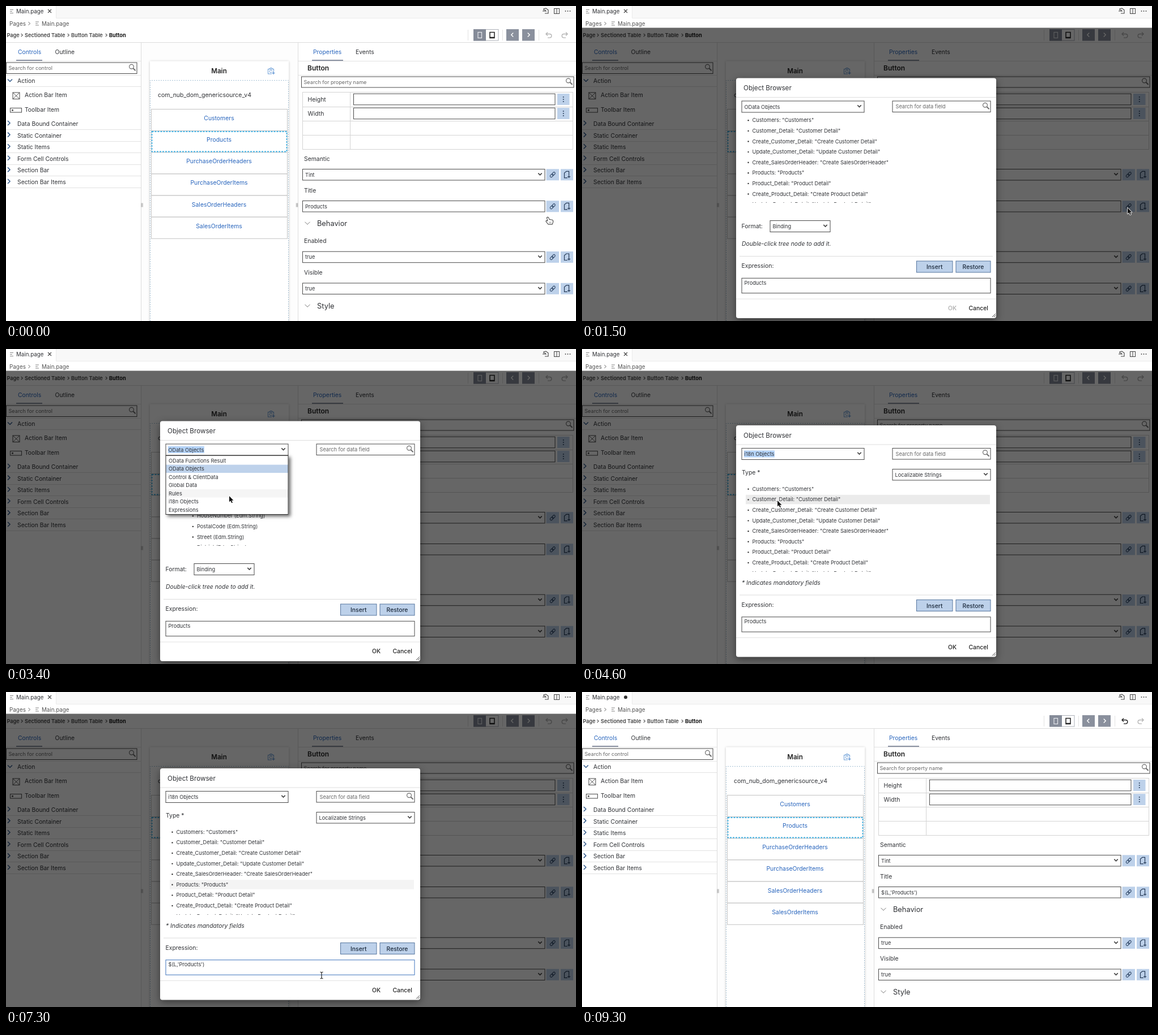
Recreate the animation shown at these times as an HTML page with a canvas. Size 1006 px wide and 557 px high, loop 9.5 s.

```html
<!DOCTYPE html>
<html lang="en">
<head>
<meta charset="utf-8">
<title>Object browser</title>
<style>
html, body { margin: 0; width: 100%; height: 100%; overflow: hidden; background: #fff; }
canvas { display: block; width: 1006px; height: 557px; }
</style>
</head>
<body>
<canvas id="stage" width="1006" height="557"></canvas>
<script>
const ctx = document.getElementById('stage').getContext('2d');
const LOOP = 9500;
const INK = '#303236', BLUE = '#2865bd', PALE = '#bdd1ea', RULE = '#dcdcdc';
const TIMES = { open: 1300, loaded: 1700, drop: 2950, pick: 3850, insert: 6450, close: 8150, undim: 8300, dirty: 8600, hide: 9250 };

const strings = [
  'Customers: "Customers"', 'Customer_Detail: "Customer Detail"',
  'Create_Customer_Detail: "Create Customer Detail"', 'Update_Customer_Detail: "Update Customer Detail"',
  'Create_SalesOrderHeader: "Create SalesOrderHeader"', 'Products: "Products"',
  'Product_Detail: "Product Detail"', 'Create_Product_Detail: "Create Product Detail"',
  'Update_Product_Detail: "Update Product Detail"'
];
const fields = ['Customers', 'Address (Address)', 'Building', 'City', 'Country', 'HouseNumber', 'PostalCode', 'Street', 'District'];
const sources = ['OData Functions Result', 'OData Objects', 'Control & ClientData', 'Global Data', 'Rules', 'i18n Objects', 'Expressions'];

// time, x, y of the pointer tip
const path = [
  [0, 957, 374], [200, 957, 374], [800, 963, 357], [1650, 963, 357], [2500, 440, 178], [2950, 440, 178],
  [3400, 394, 260], [3750, 350, 269], [4600, 345, 268], [5100, 345, 268], [5800, 348, 339],
  [6900, 348, 339], [7300, 557, 501], [7450, 557, 501], [7850, 656, 526], [8250, 660, 525],
  [8500, 660, 525], [9250, 760, 316]
];

// ---------- helpers ----------
function text(s, x, y, size = 10.4, color = INK, weight = 400, align = 'left', style = '') {
  ctx.font = `${style} ${weight} ${size}px Inter, "Liberation Sans", sans-serif`;
  ctx.fillStyle = color;
  ctx.textAlign = align;
  ctx.fillText(s, x, y + size * 0.36);
}
function rect(x1, y1, x2, y2, color) {
  ctx.fillStyle = color;
  ctx.fillRect(x1, y1, x2 - x1, y2 - y1);
}
function frame(x1, y1, x2, y2, color = '#4a4a4a', fill = '#fff', width = 1) {
  if (fill) rect(x1, y1, x2, y2, fill);
  ctx.strokeStyle = color;
  ctx.lineWidth = width;
  ctx.strokeRect(x1, y1, x2 - x1, y2 - y1);
}
function line(points, color = RULE, width = 1, dash = []) {
  ctx.strokeStyle = color;
  ctx.lineWidth = width;
  ctx.setLineDash(dash);
  ctx.beginPath();
  for (let i = 0; i < points.length; i += 2) ctx.lineTo(points[i], points[i + 1]);
  ctx.stroke();
  ctx.setLineDash([]);
}
function circle(x, y, r, color, fill = false, width = 1.2) {
  ctx.beginPath();
  ctx.arc(x, y, r, 0, 7);
  ctx.fillStyle = ctx.strokeStyle = color;
  ctx.lineWidth = width;
  fill ? ctx.fill() : ctx.stroke();
}
function at(x, y, draw, angle = 0) {
  ctx.save();
  ctx.translate(x, y);
  ctx.rotate(angle);
  draw();
  ctx.restore();
}
const down = (x, y, r = 3, color = '#444', w = 1.4) => line([x - r, y - r / 2, x, y + r / 2, x + r, y - r / 2], color, w);
const right = (x, y, r = 3, color = '#444', w = 1.4) => line([x - r / 2, y - r, x + r / 2, y, x - r / 2, y + r], color, w);
const left = (x, y, r, color, w) => line([x + r / 2, y - r, x - r / 2, y, x + r / 2, y + r], color, w);

function magnifier(x, y) {
  circle(x - 1.5, y - 1.5, 3.9, '#6a6a6a');
  line([x + 1.5, y + 1.5, x + 5.5, y + 5.5], '#6a6a6a', 1.8);
}
function search(x1, y1, x2, y2, hint) {
  frame(x1, y1, x2, y2);
  text(hint, x1 + 4, (y1 + y2) / 2, 9.15, '#666');
  magnifier(x2 - 8, (y1 + y2) / 2 - 1);
}
function field(x1, y1, x2, y2, value, list = true) {
  frame(x1, y1, x2, y2);
  text(value, x1 + 4.5, (y1 + y2) / 2 + 0.2, 9.2);
  if (list) down(x2 - 8.5, (y1 + y2) / 2 - 1, 3.2, '#444', 1.6);
}
function linkIcon(x, y) {
  at(x, y, () => {
    ctx.strokeStyle = '#2f4767';
    ctx.lineWidth = 1.1;
    for (const dx of [-5.5, -0.8]) {
      ctx.beginPath();
      ctx.roundRect(dx, -2, 6.3, 4, 2);
      ctx.stroke();
    }
  }, -Math.PI / 4);
}
function pageIcon(x, y, color = '#263b58') {
  line([x + 3.5, y + 1, x + 3.5, y - 6, x - 1, y - 6, x - 4.5, y - 3, x - 4.5, y + 5.5, x + 1, y + 5.5], color, 1.2);
  line([x + 1, y + 3.5, x + 6, y + 3.5], color, 1.2);
  line([x + 3.5, y + 1, x + 3.5, y + 6], color, 1.2);
}
function arrowBack(x, y, flip, color) {
  at(x, y, () => {
    ctx.scale(flip, 1);
    line([-2, -5, -5, -2, -2, 1], color, 1.4);
    ctx.beginPath();
    ctx.moveTo(-5, -2);
    ctx.lineTo(1.5, -2);
    ctx.arc(1.5, 1.3, 3.3, -Math.PI / 2, Math.PI / 2);
    ctx.lineTo(-2, 4.6);
    ctx.stroke();
  });
}
function listIcon(x, y) {
  for (const [dy, w] of [[-3, 6], [0, 4], [3, 6]]) line([x, y + dy, x + w, y + dy], '#888', 1);
}

// ---------- page ----------
function header(dirty) {
  rect(0, 0, 1006, 21, '#f8f8f8');
  rect(0, 0, 88, 22, '#fff');
  line([88.5, 0, 88.5, 21.5, 1006, 21.5], '#ececec');
  listIcon(7, 9.5);
  text('Main.page', 18, 9.5, 9.75);
  if (dirty) circle(77, 9.2, 3, '#333', true);
  else {
    line([74, 6, 80, 12], '#444', 1.1);
    line([80, 6, 74, 12], '#444', 1.1);
  }
  line([949, 8, 949, 5, 953, 4, 957, 7, 957, 13, 951, 13], '#444', 1.1);
  line([947, 9, 953, 9, 950.5, 6.5], '#444', 1.1);
  frame(967.5, 4.5, 976.5, 13.5, '#444', null);
  line([972, 4, 972, 14], '#444');
  for (const x of [987.5, 991.5, 995.5]) circle(x, 9, 0.9, '#444', true);
  text('Pages', 6, 31, 9.9, '#555');
  right(41, 31, 3, '#666', 1);
  listIcon(52, 31);
  text('Main.page', 63, 31, 9.75, '#555');
}

function toolbar(dirty) {
  const crumbs = [['Page', 1.5], ['Sectioned Table', 33], ['Button Table', 115], ['Button', 182]];
  crumbs.forEach(([s, x], i) => {
    text(s, x, 51.2, 9.2, i === 3 ? '#111' : '#444', i === 3 ? 700 : 600);
    if (i) right(x - 5, 51.5, 2.6, '#555', 1.1);
  });
  for (const x of [815.5, 876.5, 940.5]) line([x, 42, x, 61], '#e2e2e2');
  frame(825.5, 41.5, 869, 61, '#aeb2ba');
  rect(825, 41, 847, 61.5, '#858b98');
  frame(833, 46.5, 839.5, 56.5, '#e5e7ec', null, 1.2);
  frame(854, 46.5, 862, 56.5, '#222', null, 1.5);
  line([854, 55.5, 862, 55.5], '#222', 1.5);
  rect(883, 41, 905, 61.5, '#8a909d');
  rect(911, 41, 933, 61.5, '#8a909d');
  left(893.5, 51, 3.5, '#fff', 1.4);
  right(922.5, 51, 3.5, '#fff', 1.4);
  arrowBack(958, 51.5, 1, dirty ? '#222' : '#b5b5b5');
  arrowBack(986, 51.5, -1, '#b5b5b5');
  line([0, 64.5, 1006, 64.5], RULE);
}

function tabs(a, ax, b, bx, x1, x2) {
  text(a, ax, 81, 10.35, BLUE);
  text(b, bx, 81, 10.35);
  rect(x1, 95, x2, 97.3, '#8c93a3');
}

function controls() {
  line([238.5, 64, 238.5, 557], RULE);
  tabs('Controls', 21, 'Outline', 86.5, 18, 64);
  line([0, 97.5, 238, 97.5], '#e6e6e6');
  search(0.5, 100, 231, 119.5, 'Search for control');
  line([0, 122.5, 238, 122.5], '#e6e6e6');
  text('Action', 20, 132.5, 10.35);
  down(7, 131.5, 4, '#345b8c', 1.5);
  line([0, 142.5, 238, 142.5], '#e2e2e2');
  frame(12, 153, 24, 164.5, '#555', null, 1.1);
  line([12, 153, 24, 164.5], '#555');
  line([24, 153, 12, 164.5], '#555');
  text('Action Bar Item', 33, 157.5, 10.35);
  frame(7.5, 180.5, 27.5, 188, '#555', null, 1.1);
  rect(10, 183, 13, 185.5, '#555');
  text('Toolbar Item', 33, 183.5, 10.35);
  ['Data Bound Container', 'Static Container', 'Static Items', 'Form Cell Controls', 'Section Bar', 'Section Bar Items'].forEach((s, i) => {
    const y = 208 + i * 20.6;
    text(s, 20, y + 0.3, 10.35);
    right(5, y - 1, 4, '#345b8c', 1.5);
    line([0, Math.round(y + 10) + 0.5, 238, Math.round(y + 10) + 0.5], '#e2e2e2');
  });
}

function preview() {
  rect(239, 65, 515, 557, '#fdfdfd');
  ctx.save();
  ctx.shadowColor = 'rgba(0,0,0,.22)';
  ctx.shadowBlur = 4;
  rect(254, 97.5, 499, 570, '#fff');
  ctx.restore();
  text('Main', 376, 114.5, 11.6, '#222', 600, 'center');
  ctx.strokeStyle = '#6d9fd8';
  ctx.lineWidth = 1;
  ctx.strokeRect(462.5, 111.5, 10, 8.5);
  circle(467.5, 115.5, 2.3, '#6d9fd8', false, 1);
  line([465, 111, 466, 109.5, 469.5, 109.5, 470.5, 111], '#6d9fd8');
  rect(469, 116, 476, 123, '#fff');
  line([469.5, 118.5, 474.5, 118.5], '#5a91d2', 1.2);
  line([472, 116, 472, 121], '#5a91d2', 1.2);
  line([254.5, 557, 254.5, 131.5, 498.5, 131.5, 498.5, 557], '#a9c3d6', 1, [2, 2]);
  text('com_nub_dom_genericsource_v4', 268, 157.7, 10.5);
  ['Customers', 'Products', 'PurchaseOrderHeaders', 'PurchaseOrderItems', 'SalesOrderHeaders', 'SalesOrderItems'].forEach((s, i) => {
    const y = 182.5 + i * 38.15;
    frame(256.5, y, 496.5, y + 38, '#c4c4c4', '#fff');
    text(s, 376, y + 15.7, 10.4, BLUE, 400, 'center');
  });
  ctx.setLineDash([3, 2]);
  frame(257.5, 222, 495.5, 257.5, '#45b4e6', null, 1.8);
  ctx.setLineDash([]);
  for (const x of [239, 512.5]) for (const dx of [0, 2]) line([x + dx, 348.5, x + dx, 355.5], '#999');
}

function squareButton(x1, y1, x2, icon) {
  rect(x1, y1, x2, y1 + 20, PALE);
  icon((x1 + x2) / 2, y1 + 10);
}
function property(label, y, value, list) {
  text(label, 526, y - 28);
  field(523.5, y - 9.5, 951, y + 10, value, list);
  squareButton(953.5, y - 9.7, 976, linkIcon);
  squareButton(979, y - 9.7, 1001, pageIcon);
}

function properties(title) {
  line([515.5, 64, 515.5, 557], RULE);
  tabs('Properties', 542, 'Events', 617, 540, 595);
  line([516, 97.5, 1006, 97.5], '#e2e2e2');
  text('Button', 532, 110, 12, '#222', 600);
  line([516, 122.5, 1006, 122.5], '#e2e2e2');
  search(521.5, 125, 1002, 144, 'Search for property name');
  for (const y of [152.5, 178.5, 203.5, 228.5, 253.5]) line([523, y, 1001, y], '#d4d4d4');
  for (const x of [523.5, 607.5, 1000.5]) line([x, 152, x, 254], '#d4d4d4');
  [['Height', 165], ['Width', 190]].forEach(([s, y]) => {
    text(s, 532.5, y);
    frame(613.5, y - 9.8, 969, y + 9.8);
    squareButton(973, y - 10, 994.5, (x, cy) => [-4, 0, 4].forEach(d => circle(x, cy + d, 1, '#263b58', true)));
  });
  property('Semantic', 298, 'Tint', true);
  property('Title', 354, title, false);
  property('Enabled', 443.7, 'true', true);
  property('Visible', 499.5, 'true', true);
  [['Behavior', 384], ['Style', 530]].forEach(([s, y]) => {
    text(s, 549, y, 12.8);
    down(532, y, 4.5, '#777', 1);
  });
}

// ---------- dialog ----------
function button(x1, y, x2, label) {
  frame(x1, y - 10, x2, y + 10, '#56769f', PALE);
  text(label, (x1 + x2) / 2, y + 0.3, 10.4, '#1d2b3d', 500, 'center');
}
function selectedText(s, x, y) {
  ctx.font = '400 9.2px Inter, "Liberation Sans", sans-serif';
  rect(x - 0.5, y - 6, x + ctx.measureText(s).width + 0.5, y + 6, '#b4d3f8');
  text(s, x, y + 0.2, 9.2);
}

function rows(items, top, clipEnd, rowX, hover) {
  ctx.save();
  ctx.beginPath();
  ctx.rect(273, top - 12, 457, clipEnd - top + 12);
  ctx.clip();
  items.forEach((s, i) => {
    const y = top + i * 18.6, x = rowX(i);
    if (hover[i]) rect(289, y - 8.3, 720, y + 8.3, hover[i]);
    circle(x - 7, y + 0.3, 1.2, '#333', true);
    text(s, x, y, 9.25);
  });
  ctx.restore();
}

function dialog(t, tip) {
  const i18n = t >= TIMES.pick, inserted = t >= TIMES.insert;
  const loaded = t >= TIMES.loaded, dropped = t >= TIMES.drop && !i18n;
  const up = i18n ? 7.5 : 0, low = -up;
  ctx.save();
  ctx.shadowColor = 'rgba(0,0,0,.45)';
  ctx.shadowBlur = 14;
  ctx.shadowOffsetY = 4;
  ctx.fillStyle = '#fff';
  ctx.beginPath();
  ctx.roundRect(272, 127.5 + up, 459, 424.5 - 2 * up, 4);
  ctx.fill();
  ctx.restore();

  text('Object Browser', 285, 145.3 + up, 11.65);
  line([272, 161.5 + up, 731, 161.5 + up], '#dedede');
  const source = i18n ? 'i18n Objects' : 'OData Objects';
  field(282, 168 + up, 498, 188 + up, source);
  if (dropped || (i18n && !inserted)) selectedText(source, 286.5, 178 + up);
  search(548, 168 + up, 721, 187.5 + up, '');
  text('Search for data field', 553.5, 177.7 + up, 9.2, '#666');

  if (i18n) {
    text('Type *', 282, 218.7);
    field(548, 212.5, 721, 232, 'Localizable Strings');
    const hover = [];
    if (inserted) hover[5] = '#f4f4f4';
    const over = Math.round((tip.y - 247.5) / 18.6);
    if (over >= 0 && over < 8 && t < 7000) hover[over] = '#ebebeb';
    rows(strings, 247.5, 394, () => 300.5, hover);
    text('* Indicates mandatory fields', 282, 413.3, 10.35, INK, 400, 'left', 'italic');
  } else {
    if (loaded) rows(fields.map((s, i) => i < 2 ? s : s + ' (Edm.String)'), 202, 348, i => 300.5 + 18.2 * Math.min(i, 2), []);
    else rows(strings, 202, 348, () => 300.5, []);
    text('Format:', 281.5, 389.5);
    field(332, 379.5, 438, 399.5, 'Binding');
    text('Double-click tree node to add it.', 282, 420.5, 10.35, INK, 400, 'left', 'italic');
  }

  line([278, 442.5 + low, 725, 442.5 + low], RULE);
  text('Expression:', 281.5, 459.7 + low);
  button(590.5, 461 + low, 654, 'Insert');
  button(660, 461 + low, 721, 'Restore');
  frame(282, 481.3 + low, 721, 507.7 + low, inserted ? '#3f74bd' : '#4a4a4a');
  text(inserted ? "$(L,'Products')" : 'Products', 286.5, 489.3 + low, 9.2);
  line([272, 518 + low, 731, 518 + low], '#e2e2e2');
  text('OK', 653.5, 534.3 + low, 10.4, loaded ? '#222' : '#aaa', 500, 'center');
  text('Cancel', 699.7, 534.3 + low, 10.4, '#222', 500, 'center');
  line([724, 550 + low, 730, 544 + low], '#444');
  line([727, 550 + low, 730, 547 + low], '#444');
  if (dropped) dropdown(tip);
}

function dropdown(tip) {
  ctx.save();
  ctx.shadowColor = 'rgba(0,0,0,.6)';
  ctx.shadowBlur = 6;
  ctx.shadowOffsetX = ctx.shadowOffsetY = 3;
  rect(281.5, 188, 498.5, 293, '#fff');
  ctx.restore();
  sources.forEach((s, i) => {
    const y = 197.3 + i * 14.5;
    if (i === 1) rect(282, y - 7.2, 498, y + 7.2, '#bed2eb');
    else if (Math.abs(tip.y - y) < 7.2) rect(282, y - 7.2, 498, y + 7.2, '#f5f5f5');
    text(s, 287, y, 9.2);
  });
  frame(282, 188.5, 498, 292.5, '#333', null);
}

// ---------- pointer ----------
function pointerAt(t) {
  let i = 1;
  while (i < path.length - 1 && path[i][0] < t) i++;
  const [t0, x0, y0] = path[i - 1], [t1, x1, y1] = path[i];
  const k = Math.min(1, Math.max(0, (t - t0) / (t1 - t0)));
  const e = k * k * (3 - 2 * k);
  return { x: x0 + (x1 - x0) * e, y: y0 + (y1 - y0) * e };
}
function outline(d, fill, stroke, width) {
  const p = new Path2D(d);
  ctx.lineJoin = 'round';
  ctx.strokeStyle = stroke;
  ctx.lineWidth = width;
  ctx.stroke(p);
  ctx.fillStyle = fill;
  ctx.fill(p);
}
function pointer(t, { x, y }) {
  if (t >= TIMES.hide) return;
  at(x, y, () => {
    if (t < TIMES.open || (t > 7780 && t < 8600)) {
      outline('M-2 0Q-.5-1 .5 1L1.7 4L7 4.6Q8.5 5 8 8L7 11.5H0L-3.5 7Q-4 5.5-2 6L-.7 7Z', '#fff', '#222', 1.8);
      line([2.5, 7.5, 2.5, 10], '#555', 0.7);
      line([4.7, 7.5, 4.7, 10], '#555', 0.7);
    } else if (t > 7220 && t < 7520) {
      line([-2.5, -6, 0, -5, 2.5, -6], '#222', 1.1);
      line([0, -5, 0, 5], '#222', 1.2);
      line([-2.5, 6, 0, 5, 2.5, 6], '#222', 1.1);
    } else {
      outline('M0 0V10.5L2.4 8.3L4.2 12.2L6 11.4L4.2 7.7H7.5Z', '#111', '#fff', 1.6);
    }
  });
}

function render() {
  const t = performance.now() % LOOP;
  const tip = pointerAt(t), dirty = t >= TIMES.dirty;
  rect(0, 0, 1006, 557, '#fff');
  header(dirty);
  toolbar(dirty);
  controls();
  preview();
  properties(t >= TIMES.close ? "$(L,'Products')" : 'Products');
  if (t >= TIMES.open && t < TIMES.undim) {
    rect(0, 38.5, 1006, 557, 'rgba(0,0,0,.6)');
    if (t < TIMES.close) dialog(t, tip);
  }
  pointer(t, tip);
  requestAnimationFrame(render);
}
render();
</script>
</body>
</html>
```
